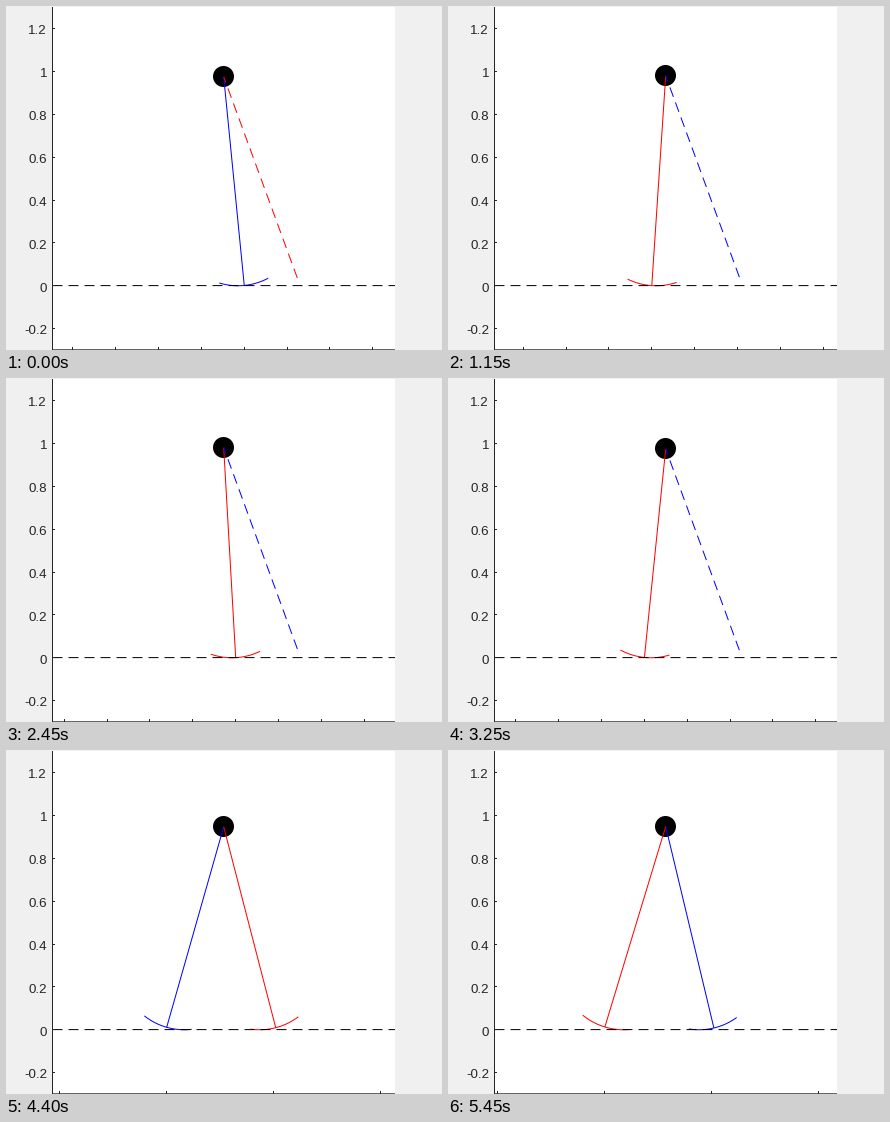
A matplotlib script that plays this animation: 436 by 344 pixels, repeating every 5.5 s.

```python
import numpy as np
import matplotlib.pyplot as plt
from matplotlib.animation import FuncAnimation
from matplotlib.patches import Circle, Rectangle

W, H, DPI = 436, 344, 100
PX = 72 / DPI                      # one pixel in points
SCALE = 214.3                      # pixels per unit
LEFT, RIGHT, MID, GROUND = 46.5, 389, 217.7, 279.75
FRAMES, INTERVAL = 110, 50

STEP = 0.5107                      # step length
PERIOD = 6.921                     # frames per step
PHASE = -0.1925
RADIUS, REST, ATTACK = 0.3, 1.0, np.radians(20.1)
REACH = (REST - RADIUS) * np.sin(ATTACK) + RADIUS * ATTACK
HALF_FOOT = np.pi / 8
INK = "#262626"
COLORS = ("#0000ff", "#ff0000")

fig = plt.figure(figsize=(W / DPI, H / DPI), dpi=DPI, facecolor="#f0f0f0")
ax = fig.add_axes([0, 0, 1, 1])
ax.set_xlim(0, W)
ax.set_ylim(H, 0)
ax.axis("off")


def line(color, z, xs=(), ys=(), dashed=False):
    style = dict(dashes=(10, 6), dash_capstyle="butt") if dashed else {}
    item, = ax.plot(xs, ys, color=color, lw=PX, zorder=z, snap=False,
                    solid_capstyle="butt", **style)
    return item


def pixel(v):
    """Centre of the pixel that holds v."""
    return np.floor(v) + 0.5


def draw_axes():
    ax.add_patch(Rectangle((LEFT, 1), RIGHT - LEFT, H - 1, fc="white",
                           ec="none", snap=False, zorder=0))
    line(INK, 8, (LEFT, LEFT), (1, H))
    line(INK, 8, (LEFT, RIGHT), (H - 0.2, H - 0.2))
    line("black", 5, (LEFT, RIGHT), (279.6, 279.6), dashed=True)
    for i in range(-1, 7):
        y = GROUND - 0.2 * i * SCALE
        line(INK, 8, (LEFT, LEFT + 2.5), (pixel(y), pixel(y)))
        ax.text(41, y + 5.75, f"{0.2 * i:.1f}".replace(".0", ""), color=INK,
                family="Liberation Sans", size=13.33 * PX, ha="right",
                va="baseline", zorder=8)


draw_axes()
ball = ax.add_patch(Circle((MID, 70), 10.5, fc="black", ec="none", zorder=2))
legs = [line(c, 4) for c in COLORS]
feet = [line(c, 4) for c in COLORS]
swings = [line(c, 4, dashed=True) for c in COLORS]
ticks = line(INK, 8)


def hip_state(phase):
    """Hip distance past the rear foot and hip height."""
    a = 2 * np.pi * phase
    x = STEP * phase - 0.0025 * np.sin(a)
    y = 0.967 + 0.018 * np.cos(a) - 0.0021 * np.cos(2 * a)
    return x, y


def lean(dx, height):
    """Leg angle at which a rolling foot carries the hip dx past its base."""
    angle = dx
    for _ in range(6):
        gap = RADIUS * angle + (height - RADIUS) * np.tan(angle) - dx
        angle -= gap / (RADIUS + (height - RADIUS) / np.cos(angle) ** 2)
    return angle


def to_px(x, y):
    return MID + np.asarray(x) * SCALE, GROUND - np.asarray(y) * SCALE


def place_leg(i, dx, height):
    angle = lean(dx, height)
    cx = RADIUS * angle - dx
    bend = np.linspace(-HALF_FOOT, HALF_FOOT, 40) - angle
    foot_x = cx + RADIUS * np.sin(bend)
    foot_y = RADIUS * (1 - np.cos(bend))
    tip_x = cx - RADIUS * np.sin(angle)
    tip_y = RADIUS * (1 - np.cos(angle))
    legs[i].set_data(*to_px((0, tip_x), (height, tip_y)))
    feet[i].set_data(*to_px(foot_x, foot_y))


def place_swing(i, height):
    # the dash pattern starts at the foot
    swings[i].set_data(*to_px((REST * np.sin(ATTACK), 0),
                              (height - REST * np.cos(ATTACK), height)))


def place_ticks(dx):
    gap = 0.5 if dx > 0.2 else 0.2
    xs = MID + (gap * np.arange(-8, 9) - dx) * SCALE
    xs = pixel(xs[(xs > LEFT) & (xs < RIGHT)])
    px = np.column_stack((xs, xs, np.full(len(xs), np.nan))).ravel()
    ticks.set_data(px, np.tile((H, H - 3.0, np.nan), len(xs)))


def update(frame):
    for item in legs + feet + swings:
        item.set_data([], [])
    total = PHASE + frame / PERIOD
    step = int(np.floor(total))
    dx, height = hip_state(total - step)
    both = STEP - REACH < dx < REACH
    if dx >= REACH:
        step += 1
        dx -= STEP
    rear, front = step % 2, (step + 1) % 2
    ball.center = pixel(MID), pixel(GROUND - height * SCALE)
    place_leg(rear, dx, height)
    if both:
        place_leg(front, dx - STEP, height)
    else:
        place_swing(front, height)
    place_ticks(dx)
    return [ball, ticks] + legs + feet + swings


anim = FuncAnimation(fig, update, frames=FRAMES, interval=INTERVAL,
                     init_func=lambda: update(0), repeat=True, repeat_delay=0)
plt.show()
```
